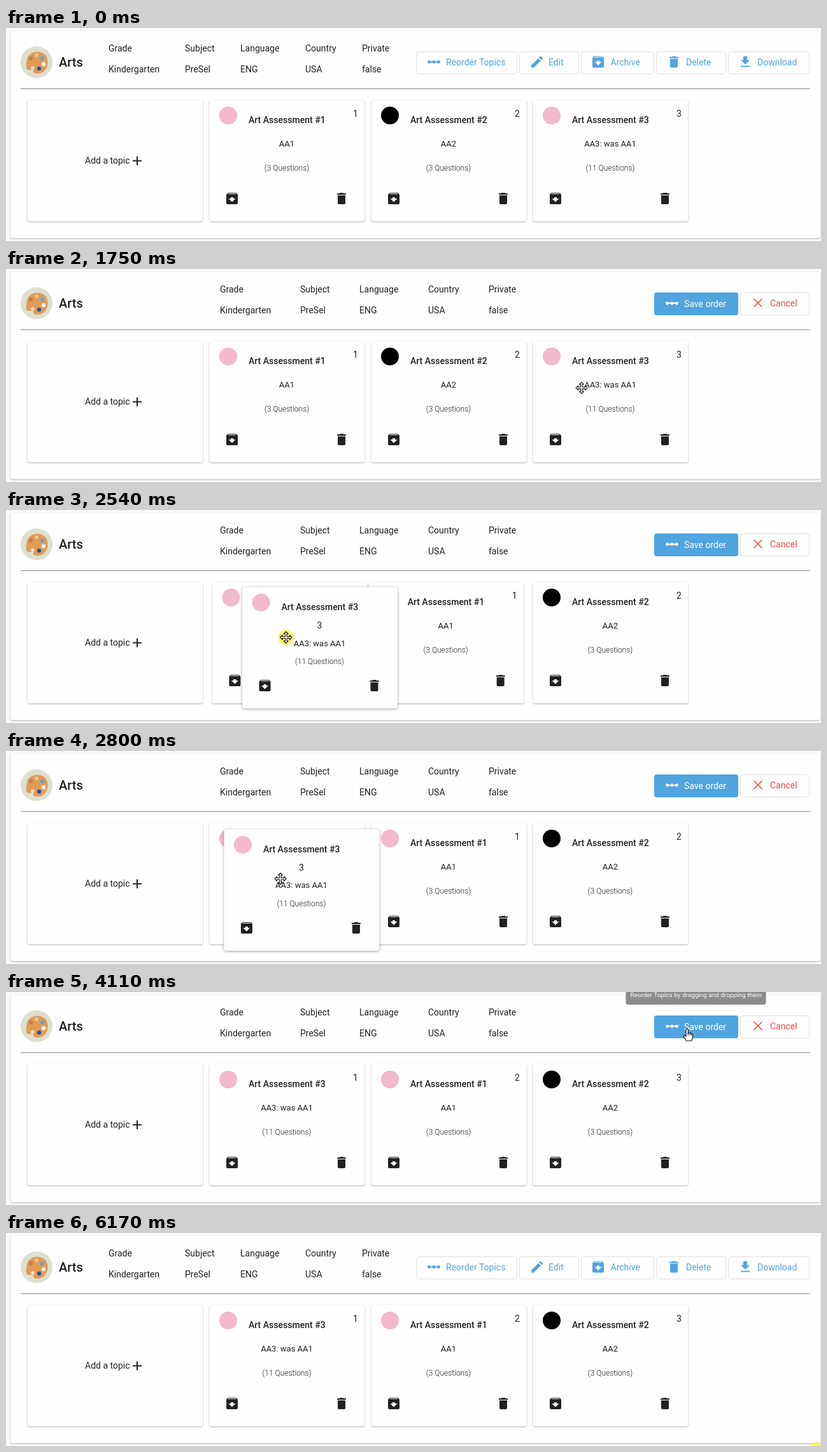
An HTML page for the animation above (6.3 s loop, 1280 by 336 pixels).

```html
<!DOCTYPE html>
<html lang="en">
<head>
<meta charset="utf-8">
<title>Reorder topics</title>
<style>
html, body { margin: 0; width: 100%; height: 100%; overflow: hidden; background: #fafafa; }
svg { display: block; width: 100%; height: 100%; font: 14px Roboto, sans-serif; fill: #212121; }
.mid { text-anchor: middle; }
.medium { font-weight: 500; }
.paper { fill: #fefefe; filter: drop-shadow(0 1px 1px rgba(0,0,0,.3)); }
.lifted { filter: drop-shadow(0 1px 2px rgba(0,0,0,.36)); }
.frame { fill: #fefefe; stroke: #e0e0e0; }
.blue { fill: #50a4e0; }
.white { fill: #fff; }
.red { fill: #f04a3c; }
.cursor { fill: #fff; stroke: #111; stroke-width: 1.1; stroke-linejoin: round; }
</style>
</head>
<body>
<svg id="stage" viewBox="0 0 1280 336"></svg>
<script>
const icons = {
  archive: 'M20.54 5.23l-1.39-1.68C18.88 3.21 18.47 3 18 3H6c-.47 0-.88.21-1.16.55L3.46 5.23C3.17 5.57 3 6.02 3 6.5V19c0 1.1.9 2 2 2h14c1.1 0 2-.9 2-2V6.5c0-.48-.17-.93-.46-1.27zM12 17.5L6.5 12H10v-2h4v2h3.5L12 17.5zM5.12 5l.81-1h12l.94 1H5.12z',
  trash: 'M6 19c0 1.1.9 2 2 2h8c1.1 0 2-.9 2-2V7H6v12zM19 4h-3.5l-1-1h-5l-1 1H5v2h14V4z',
  edit: 'M3 17.25V21h3.75L17.81 9.94l-3.75-3.75L3 17.25zM20.71 7.04c.39-.39.39-1.02 0-1.41l-2.34-2.34c-.39-.39-1.02-.39-1.41 0l-1.83 1.83 3.75 3.75 1.83-1.83z',
  download: 'M19 9h-4V3H9v6H5l7 7 7-7zM5 18v2h14v-2H5z',
  scale: 'M19.5 9.5c-1.03 0-1.9.62-2.29 1.5h-2.92c-.39-.88-1.26-1.5-2.29-1.5s-1.9.62-2.29 1.5H6.79c-.39-.88-1.26-1.5-2.29-1.5C3.12 9.5 2 10.62 2 12s1.12 2.5 2.5 2.5c1.03 0 1.9-.62 2.29-1.5h2.92c.39.88 1.26 1.5 2.29 1.5s1.9-.62 2.29-1.5h2.92c.39.88 1.26 1.5 2.29 1.5 1.38 0 2.5-1.12 2.5-2.5s-1.12-2.5-2.5-2.5z',
  close: 'M19 6.1L17.9 5 12 10.9 6.1 5 5 6.1 10.9 12 5 17.9 6.1 19 12 13.1 17.9 19 19 17.9 13.1 12z',
  add: 'M19 13h-6v6h-2v-6H5v-2h6V5h2v6h6v2z'
};

const text = (x, y, s, cls = '', extra = '') => `<text x="${x}" y="${y}" class="${cls}" ${extra}>${s}</text>`;
const icon = (name, x, y, cls = '') =>
  `<path d="${icons[name]}" class="${cls}" transform="translate(${x - 12} ${y - 12})"/>`;
const rect = (x, y, w, h, cls, r = 4) =>
  `<rect x="${x}" y="${y}" width="${w}" height="${h}" rx="${r}" class="${cls}"/>`;
const dot = (x, y, r, fill) => `<circle cx="${x}" cy="${y}" r="${r}" fill="${fill}"/>`;

const fields = [['Grade', 'Kindergarten'], ['Subject', 'PreSel'], ['Language', 'ENG'], ['Country', 'USA'], ['Private', 'false']];
const columns = xs => fields.map(([k, v], i) => text(xs[i], 37, k) + text(xs[i], 70, v)).join('');

const button = (x, end, name, iconX, label, labelX, color = 'blue') =>
  rect(x + .5, 37.5, end - x - 1, 35, 'frame') + icon(name, iconX, 53.5, color) + text(labelX, 59, label, color);

const viewHeader = columns([161, 281, 368, 470, 559]) +
  button(644, 803, 'scale', 672, 'Reorder Topics', 691) +
  button(806, 900, 'edit', 834, 'Edit', 852) +
  button(903, 1018, 'archive', 930, 'Archive', 949.5) +
  button(1021, 1131, 'trash', 1049, 'Delete', 1068) +
  button(1134, 1262, 'download', 1161, 'Download', 1180);

const orderHeader = columns([336, 462, 555, 663, 758]) +
  rect(1018, 37, 132, 36, 'blue') + icon('scale', 1046, 54, 'white') + text(1065, 59.5, 'Save order', 'white') +
  button(1153, 1262, 'close', 1181, 'Cancel', 1200, 'red');

const palette = dot(48, 54, 25, '#dedfcf') +
  '<path d="M33 49C36 38 50 34 60 41C69 48 67 65 57 70C49 74 42 71 43 68C44 64 39 67 34 66C30 63 32 56 33 49Z" fill="#e09b59"/>' +
  dot(48, 43, 3, '#f0c48c') + dot(39, 48, 3.2, '#c97f45') + dot(57, 48, 3.2, '#6f9fc6') +
  dot(59, 57, 3.2, '#f8f1e4') + dot(52, 64, 3.2, '#28559a') + dot(42, 63, 2.8, '#f0dfc4');

const topics = [
  { id: 1, note: 'AA1', count: 3, color: '#f3b9cc' },
  { id: 2, note: 'AA2', count: 3, color: '#000' },
  { id: 3, note: 'AA3: was AA1', count: 11, color: '#f3b9cc' }
];
// A lifted card puts its number in the text flow, pushing the notes down.
const card = (t, lifted) =>
  rect(-.5, -.5, 244, 191.5, 'paper' + (lifted ? ' lifted' : '')) + dot(29, 24, 14, t.color) +
  text(61, 36, 'Art Assessment #' + t.id, 'medium') +
  text(lifted ? 121 : 229, lifted ? 65 : 26, t.id, 'mid num') +
  text(121, lifted ? 92.5 : 73, t.note, 'mid', 'font-size="13"') +
  text(121, lifted ? 121 : 111, `(${t.count} Questions)`, 'mid', 'font-size="12" font-weight="300"') +
  icon('archive', 35, 155) + icon('trash', 207, 155);

const stage = document.getElementById('stage');
stage.innerHTML =
  rect(7, 5, 1272, 326.5, 'paper') + palette + text(83, 61, 'Arts', 'medium', 'font-size="20"') +
  `<g id="view">${viewHeader}</g><g id="order">${orderHeader}</g>` +
  '<path d="M23 95.5H1263" stroke="#9a9a9a"/><path d="M23 96.5H1263" stroke="#e4e4e4"/>' +
  rect(33.5, 113.5, 275.5, 191.5, 'paper') + text(124, 214, 'Add a topic') + icon('add', 206, 209.5) +
  topics.map(t => `<g id="topic${t.id}">${card(t)}</g>`).join('') +
  `<g id="drag">${card(topics[2], true)}</g>` +
  '<g id="tip">' + rect(-110.5, -32, 221, 32, '', 4).replace('/>', ' fill="#616161" fill-opacity=".9"/>') +
  text(0, -12.5, 'Reorder Topics by dragging and dropping them', 'mid white', 'font-size="10"') + '</g>' +
  '<circle id="press" r="12" fill="#fbf35c" fill-opacity=".9"/>' +
  '<g id="cursor" class="cursor">' +
  '<path id="arrow" d="M.5 .5V16.5L4.2 13L6.7 19L9 18L6.5 12.2H11Z"/>' +
  '<g id="hand"><path d="M-1.5 1.9a1.6 1.6 0 0 1 3.2 0V7a1.5 1.5 0 0 1 2.7 .3a1.5 1.5 0 0 1 2.5 .6a1.3 1.3 0 0 1 2 1.1V13c0 3-1.5 3.5-1.5 6H-1.2c0-2-3.6-5-4-7.2c-.3-1.6 1.5-2 2.4-.8L-1.5 12.3z"/><path d="M1.7 7v3.5M4.4 7.6v3M6.9 8.2v2.6"/></g>' +
  '<path id="move" d="M0-9L3.5-5.5H1.3V-1.3H5.5V-3.5L9 0L5.5 3.5V1.3H1.3V5.5H3.5L0 9L-3.5 5.5H-1.3V1.3H-5.5V3.5L-9 0L-5.5-3.5V-1.3H-1.3V-5.5H-3.5Z"/></g>';

const el = id => document.getElementById(id);
const show = (id, on) => { el(id).style.display = on ? '' : 'none'; };
const place = (id, x, y, s = 1) => el(id).setAttribute('transform', `translate(${x} ${y}) scale(${s})`);
const clamp = v => Math.max(0, Math.min(1, v));
const ease = v => 1 - (1 - clamp(v)) ** 3;
const within = (t, a, b) => t >= a && t < b;

// Monotone cubic curve through [time, x, y] keys.
function along(keys, t, axis) {
  const last = keys.length - 1;
  if (t <= keys[0][0]) return keys[0][axis];
  if (t >= keys[last][0]) return keys[last][axis];
  let i = 0;
  while (keys[i + 1][0] <= t) i++;
  const slope = k => (keys[k + 1][axis] - keys[k][axis]) / (keys[k + 1][0] - keys[k][0]);
  const tangent = k => {
    if (k === 0) return slope(0);
    if (k === last) return 0;
    const a = slope(k - 1), b = slope(k);
    return a * b <= 0 ? 0 : 2 * a * b / (a + b);
  };
  const h = keys[i + 1][0] - keys[i][0], u = (t - keys[i][0]) / h;
  const s = u * u * (3 - 2 * u);
  return keys[i][axis] * (1 - s) + keys[i + 1][axis] * s +
    h * u * (1 - u) * ((1 - u) * tangent(i) - u * tangent(i + 1));
}

const pointer = [
  [250, 1217, 322], [830, 739, 76], [890, 732, 67], [1090, 733, 72], [1350, 733, 72],
  [1750, 904, 187.5], [1880, 904, 190], [1940, 904, 190], [2280, 728, 199], [2540, 440, 201],
  [2600, 431, 201.5], [3190, 431, 201.5], [3350, 520, 218], [3780, 1019, 121], [3940, 1069.5, 58],
  [4300, 1069.5, 58], [4450, 1098, 216], [5110, 1133, 239]
];
const dragPath = [
  [1940, 828, 114], [2280, 690, 121], [2540, 372, 122], [2600, 354, 126], [2800, 343, 124], [2860, 320, 114]
];
const LOOP = 6300, EDIT = 1350, SAVE = 4320, DROP = 2860;
const presses = [[1290, EDIT], [1880, 2600], [4250, SAVE], [6170, LOOP]];

function drawTip(t) {
  const second = t > 3000;
  const p = clamp((t - (second ? 3950 : 826)) / 200);
  const out = clamp((t - (second ? SAVE : EDIT)) / 100);
  const on = p > .3 && out < 1;
  show('tip', on);
  if (!on) return;
  place('tip', second ? 1083.5 : 723, 20, p < .5 ? p * 1.98 : .98 + p * .02);
  el('tip').setAttribute('opacity', p * (1 - out));
}

function drawCursor(t, ordering) {
  const x = along(pointer, t, 1), y = along(pointer, t, 2);
  show('cursor', within(t, 250, 5440));
  place('cursor', x, y);
  el('cursor').setAttribute('opacity', 1 - clamp((t - 5180) / 260));
  const overCards = ordering && x > 320 && x < 1071 && y > 114 && y < 305;
  const overButton = x > (ordering ? 1018 : 644) && x < 1262 && y > 37 && y < 73;
  show('move', overCards);
  show('hand', overButton);
  show('arrow', !overCards && !overButton);
  show('press', presses.some(([a, b]) => within(t, a, b)));
  if (t > 6000) place('press', 1272, 342);
  else place('press', x, y);
}

function draw(t) {
  const ordering = within(t, EDIT, SAVE);
  show('view', !ordering);
  show('order', ordering);

  const first = ease((t - 2070) / 180), second = ease((t - 2400) / 190);
  const slots = [second, 1 + first, 2 - first - second];
  topics.forEach((topic, i) => {
    const id = 'topic' + topic.id;
    place(id, 320 + 254 * slots[i], 114);
    el(id).querySelector('.num').textContent = t < DROP ? topic.id : Math.round(slots[i]) + 1;
  });
  show('drag', within(t, 1940, DROP));
  place('drag', along(dragPath, t, 1), along(dragPath, t, 2));

  drawTip(t);
  drawCursor(t, ordering);
}

const start = performance.now();
function tick() {
  draw((performance.now() - start) % LOOP);
  requestAnimationFrame(tick);
}
tick();
</script>
</body>
</html>
```
